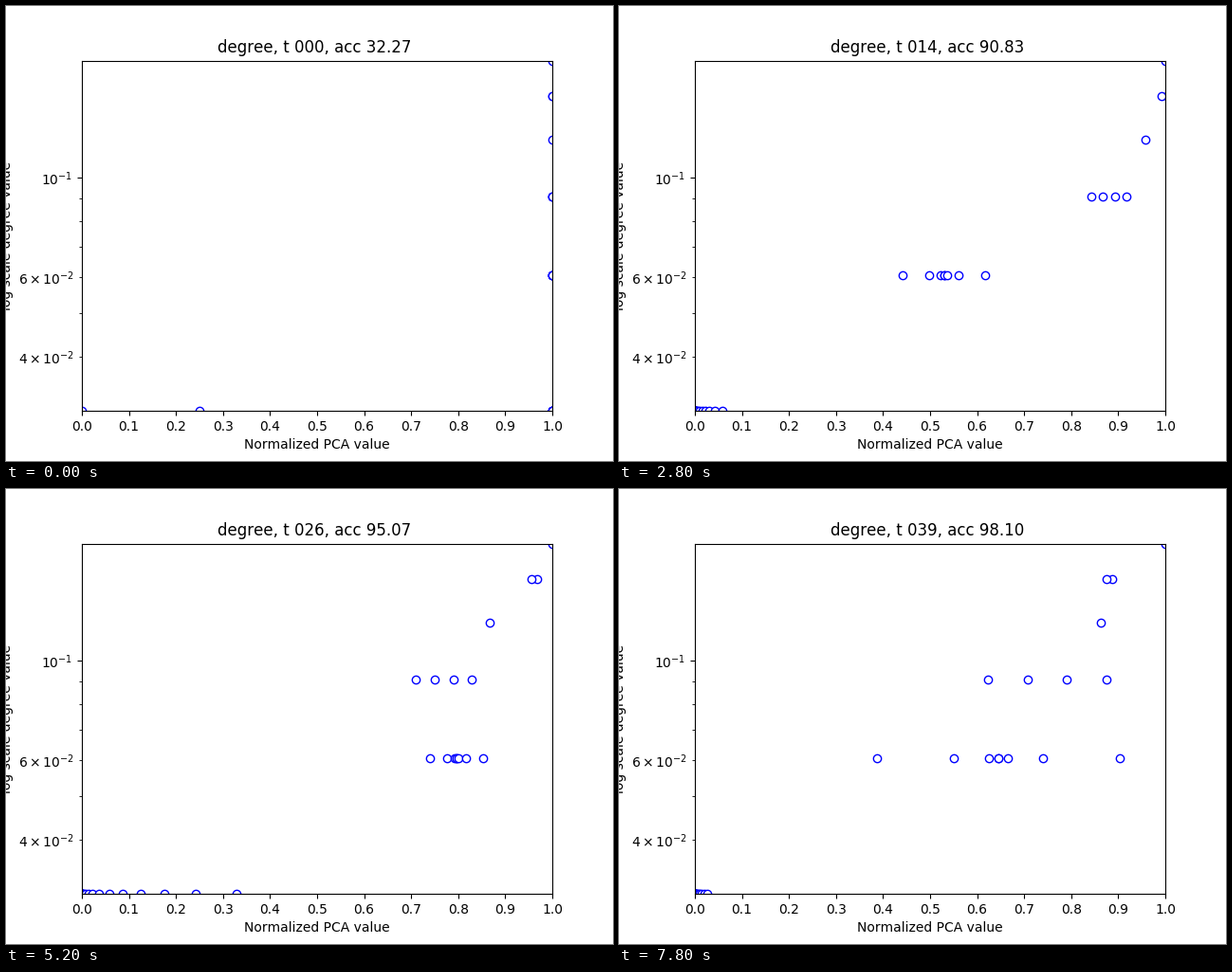
A matplotlib script for the animation above (8000 ms loop, 640 px wide and 480 px high).

```python
import numpy as np
import matplotlib.pyplot as plt
from matplotlib.animation import FuncAnimation

STEPS = 40
INTERVAL = 200
BEST_EPOCH = 31

# Key epochs, and at each: accuracy, reach of the leaves, range per degree.
EPOCHS = [0, 9, 14, 19, 26, 31, 39]
ACCURACY = [32.27, 82.53, 90.83, 84.34, 95.07, 99.48, 98.10]
REACH = [0.075, 0.058, 0.225, 0.328, 0.083, 0.027]
LOW2 = [0.365, 0.442, 0.619, 0.740, 0.770, 0.387]
HIGH2 = [0.450, 0.617, 0.716, 0.853, 0.893, 0.903]
LOW3 = [0.766, 0.843, 0.702, 0.710, 0.847, 0.623]
HIGH3 = [0.777, 0.917, 0.805, 0.829, 0.918, 0.875]
MID4 = [0.883, 0.958, 0.849, 0.867, 0.976, 0.863]
MID5 = np.array([0.938, 0.998, 0.949, 0.962, 0.984, 0.882])


def group(low, high, count, power=1):
    """Nodes between low and high, bunched in the middle; all start at 1."""
    s = np.linspace(-1, 1, count)
    u = 0.5 + 0.5 * np.sign(s) * np.abs(s) ** power
    low, high = np.reshape(low, (-1, 1)), np.reshape(high, (-1, 1))
    return np.vstack([np.ones(count), low + (high - low) * u])


def leaf_group(count):
    """Nodes crowded near 0 with a thin tail out to the reach."""
    n = np.arange(count)
    start = np.minimum(n ** 2 / 4, 1)
    return np.vstack([start, np.outer(REACH, (n / n[-1]) ** 5)])


groups = [
    leaf_group(18),
    group(LOW2, HIGH2, 8, power=3),
    group(LOW3, HIGH3, 4),
    group(MID4, MID4, 1),
    group(MID5 + 0.006, MID5 - 0.006, 2),
    np.ones((len(EPOCHS), 1)),
]
tracks = np.hstack(groups).T
heights = np.concatenate(
    [np.full(g.shape[1], d / 33) for d, g in enumerate(groups, start=1)])

plt.rcParams["text.kerning_factor"] = 6
fig, ax = plt.subplots(figsize=(6.4, 4.8), dpi=100)
ax.set_yscale("log")
ax.set_xlim(0, 1)
ax.set_ylim(1 / 33, 6 / 33)
ax.set_xticks(np.arange(11) / 10)
ax.set_xlabel("Normalized PCA value")
ax.set_ylabel("log scale degree value")
title = ax.set_title("")
dots, = ax.plot([], [], "o", mfc="white", mec="blue")


def update(epoch):
    x = [np.interp(epoch, EPOCHS, track) for track in tracks]
    dots.set_data(x, heights)
    acc = np.interp(epoch, EPOCHS, ACCURACY)
    mark = "*" if epoch == BEST_EPOCH else " "
    title.set_text(f"degree, t {epoch:03d}, acc {acc:.2f}{mark}")
    return dots, title


anim = FuncAnimation(fig, update, frames=STEPS, interval=INTERVAL,
                     init_func=lambda: update(0), repeat=True, repeat_delay=0)
plt.show()
```
